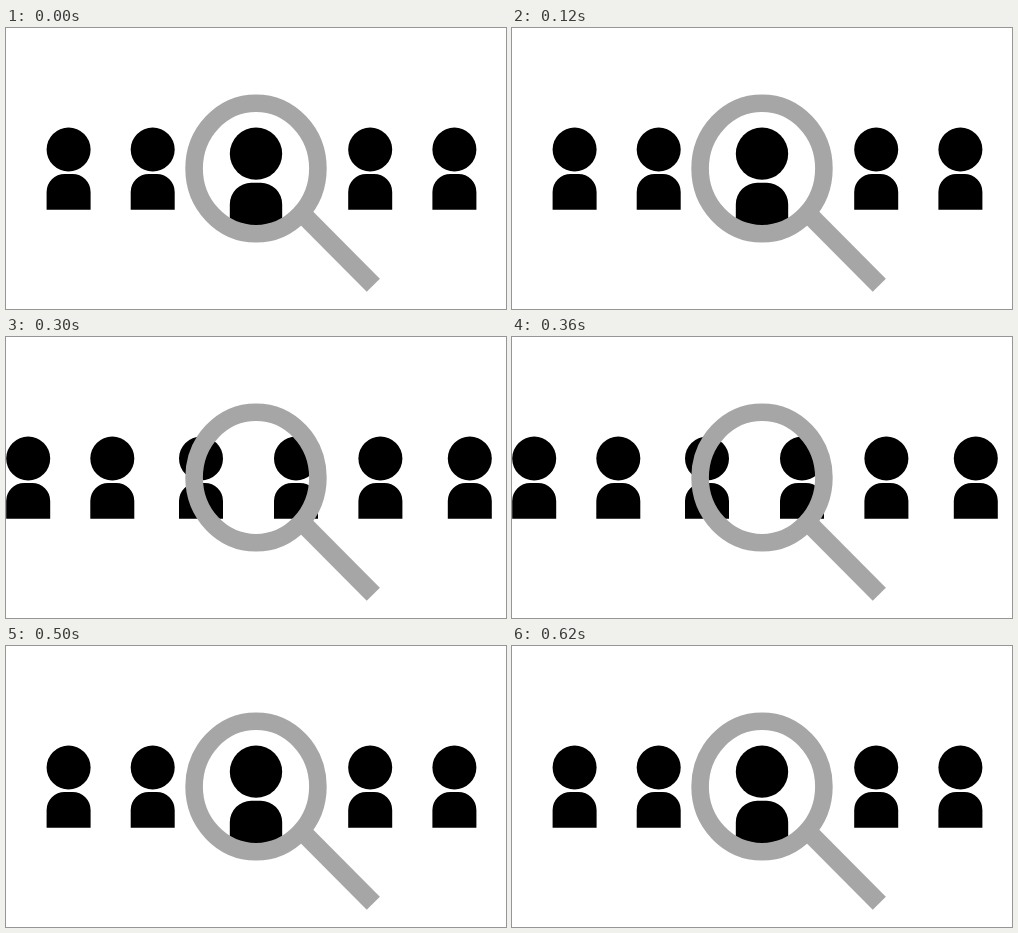
An HTML page for the animation above (0.7 s loop, 500 by 281 pixels).

```html
<!DOCTYPE html>
<html lang="en">
<head>
<meta charset="utf-8">
<title>Magnifier over a row of people</title>
<style>
  html, body { margin: 0; width: 100%; height: 100%; overflow: hidden; background: #fff; }
  svg { display: block; width: 100%; height: 100%; }
</style>
</head>
<body>
<svg viewBox="0 0 500 281">
  <defs>
    <g id="person">
      <circle cy="22" r="22"/>
      <path d="M-22 82.3V64.5A18 18 0 0 1 -4 46.5H4A18 18 0 0 1 22 64.5V82.3Z"/>
    </g>
  </defs>
  <g id="row"></g>
  <g fill="none" stroke="#a6a6a6">
    <path d="M299 188.5L367.3 257.3" stroke-width="18.5"/>
    <ellipse cx="250" cy="140.5" rx="61.9" ry="65.3" stroke-width="17.6"/>
  </g>
</svg>
<script>
const LOOP = 700;
const TOP = 99.5;
const ZOOM = 1.19;

// Each pose: start time, centres of the people, and who is magnified.
const poses = [
  { at: 0, xs: [62.6, 146.7, 250, 364.2, 448.4], big: 2 },
  { at: 200, xs: [50.2, 134.3, 223, 363.7, 447.9] },
  { at: 300, xs: [22.2, 106.3, 195, 290, 374.4, 463.8] },
  { at: 400, xs: [62, 146.2, 273.2, 363.7, 447.9] },
  { at: 500, xs: [62.6, 146.7, 250, 364.2, 448.4], big: 2 }
];

const row = document.getElementById("row");
const people = Array.from({ length: 6 }, () => {
  const use = document.createElementNS("http://www.w3.org/2000/svg", "use");
  use.setAttribute("href", "#person");
  return row.appendChild(use);
});

function draw(ms) {
  const t = ms % LOOP;
  const pose = poses.filter(p => p.at <= t).pop();
  people.forEach((person, i) => {
    const x = pose.xs[i];
    person.style.display = x === undefined ? "none" : "";
    if (x === undefined) return;
    const scale = i === pose.big ? ZOOM : 1;
    person.setAttribute("transform", `translate(${x} ${TOP}) scale(${scale})`);
  });
}

let start;
function tick(now) {
  start ??= now;
  draw(Math.max(0, now - start));
  requestAnimationFrame(tick);
}
draw(0);
requestAnimationFrame(tick);
</script>
</body>
</html>
```
